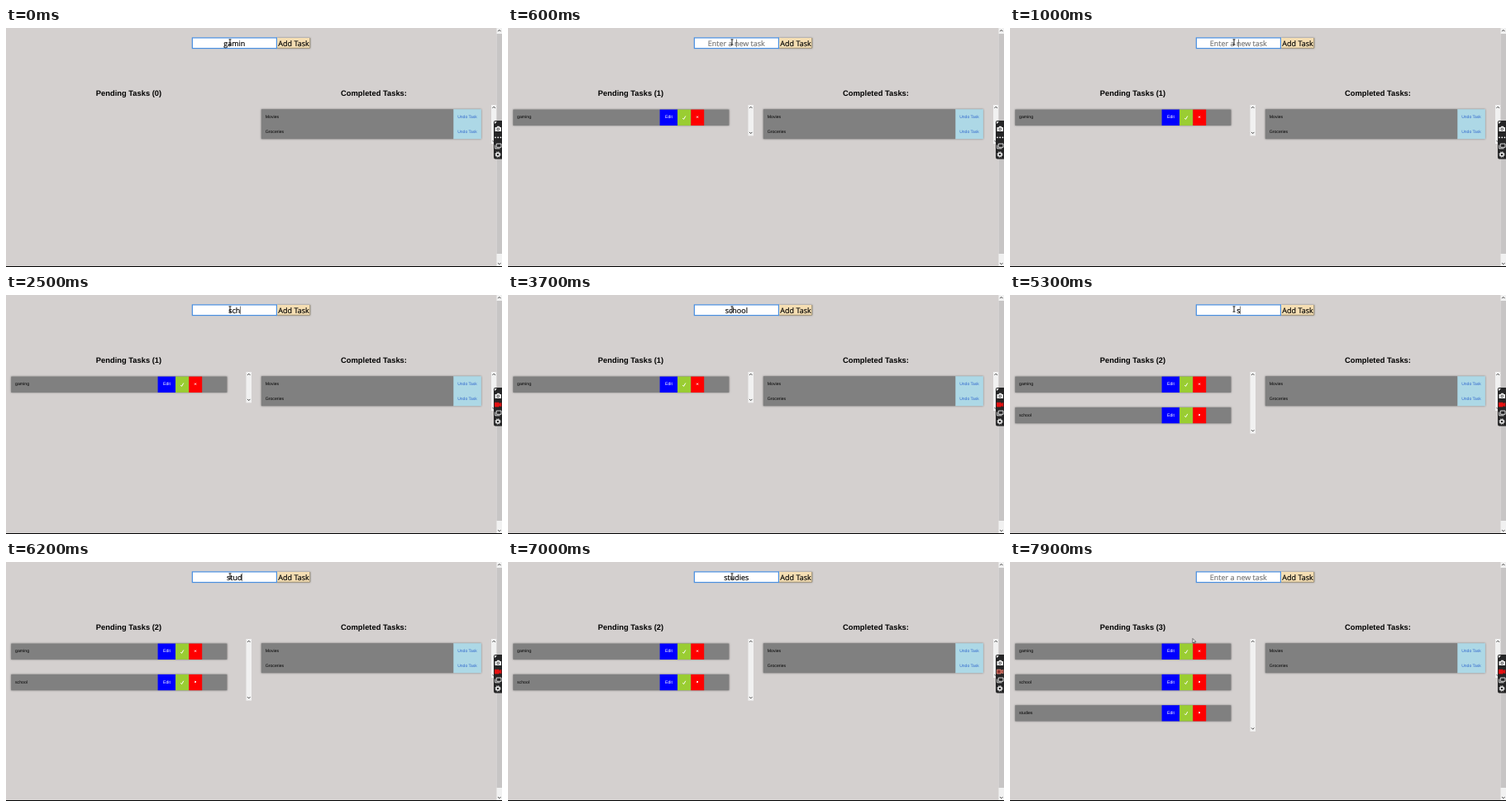
These frames come from a looping animation (600 px wide and 289 px high, 8000 ms). An HTML page:

```html
<!DOCTYPE html>
<html lang="en">
<head>
<meta charset="utf-8">
<title>Task list</title>
<style>
  html, body { margin: 0; width: 100%; height: 100%; overflow: hidden; background: #d4d0cf; }
  svg { display: block; width: 100%; height: 100%; }
  text { text-rendering: geometricPrecision; font: 5.2px "Liberation Sans", Arial, sans-serif; }
  .head { font-weight: bold; font-size: 9.35px; text-anchor: middle; }
  .form { font: 9px "Open Sans", "Noto Sans", sans-serif; text-anchor: middle; stroke: currentColor; stroke-width: .18px; }
  .undo { font-size: 5px; fill: #2f66cc; text-anchor: middle; }
  .card { filter: drop-shadow(0 .8px .9px #0006); }
  .line { fill: none; stroke-width: 1; }
</style>
</head>
<body>
<svg viewBox="0 0 600 289" preserveAspectRatio="none">
  <defs>
    <path id="up" class="line" stroke="#444" d="M-1.7 .9 0 -.8 1.7 .9"/>
    <path id="down" class="line" stroke="#444" d="M-1.7 -.9 0 .8 1.7 -.9"/>
    <g id="buttons">
      <rect x="183.6" y="98.6" width="21.5" height="19.3" fill="#00f"/>
      <rect x="205.1" y="98.6" width="16.2" height="19.3" fill="#9acd32"/>
      <rect x="221.3" y="98.6" width="15.9" height="19.3" fill="#f00"/>
      <text x="190" y="109.4" fill="#fff">Edit</text>
      <path class="line" stroke="#fff" d="M211.3 109 212.5 110.400 214.8 106.5"/>
      <path class="line" stroke="#fff" stroke-width=".8" d="M228.2 106.7 230 108.5M230 106.7 228.2 108.5"/>
    </g>
  </defs>

  <rect width="600" height="289" fill="#d4d0cf"/>

  <!-- new task form -->
  <rect x="328" y="12" width="40" height="12.5" fill="#f5deb3" class="card"/>
  <path class="line" stroke="#9b8f78" stroke-width=".7" d="M328 24.3H367.7V12"/>
  <rect x="225.4" y="11.9" width="102" height="12.7" fill="#fff" stroke="#4a90e2" stroke-width="1.2"/>
  <text class="form" x="348" y="21.5">Add Task</text>
  <text class="form" id="entry" x="276.3" y="21.5"></text>
  <rect id="caret" y="13.6" width=".7" height="9.6" fill="#444"/>

  <text class="head" id="pending" x="148.5" y="82.4"></text>
  <text class="head" x="445" y="82.4">Completed Tasks:</text>

  <!-- pending list -->
  <g id="rows"></g>
  <g id="bar">
    <rect id="track" x="290.5" y="93" width="6.5" fill="#f1f1f1"/>
    <use href="#up" x="293.7" y="96"/>
    <use href="#down" id="barEnd" x="293.7"/>
  </g>

  <!-- completed list -->
  <g class="card">
    <rect x="308.8" y="98.2" width="232.500" height="36" fill="#808080"/>
    <rect x="541.3" y="98.2" width="33.6" height="36" fill="#add8e6"/>
  </g>
  <text x="313.7" y="109.3">Movies</text>
  <text x="313.7" y="127.4">Groceries</text>
  <text class="undo" x="558" y="109.3">Undo Task</text>
  <text class="undo" x="558" y="127.4">Undo Task</text>
  <rect x="587" y="93" width="6.5" height="47" fill="#f1f1f1"/>
  <use href="#up" x="590.2" y="96"/>
  <use href="#down" x="590.2" y="137"/>

  <!-- page scrollbar -->
  <rect x="593.5" width="6.5" height="289" fill="#f1f1f1"/>
  <rect x="593.5" y="7" width="6.5" height="266" fill="#c7c5c5"/>
  <use href="#up" x="596.8" y="3.2"/>
  <use href="#down" x="596.8" y="285"/>
  <rect y="288" width="600" height="1"/>

  <!-- capture toolbar -->
  <path fill="#252526" d="M600 112H592Q590 112 590 114V156Q590 158.5 592 158.5H600Z"/>
  <path fill="#fff" d="M591 113.3H594L591 116Z"/>
  <g class="line" stroke="#eee">
    <path fill="#eee" stroke="none" d="M591.5 120H593.5L594.2 118.7H596.8L597.5 120H599V125H591.5Z"/>
    <circle cx="595.3" cy="122.3" r="1.3" stroke="#252526" stroke-width=".8"/>
    <path d="M593.3 140H599V144.3H593.3ZM591.7 141.5V145.8H597.5" stroke-width=".9"/>
    <circle cx="595" cy="153" r="2" stroke-width="1.5"/>
    <circle cx="595" cy="153" r="3.2" stroke-dasharray="1.25 1.263"/>
  </g>
  <g id="dots" fill="#fff">
    <circle cx="592" cy="132.3" r=".9"/><circle cx="595.2" cy="132.3" r=".9"/><circle cx="598.4" cy="132.3" r=".9"/>
  </g>
  <path id="camera" stroke-width=".8" d="M591.4 130.2H596.3V135H591.4ZM596.3 132 598.9 130.4V134.8L596.3 133.2"/>

  <!-- pointers -->
  <path id="beam" class="line" stroke="#222" stroke-width=".8" d="M269.5 13.9H272.5M271 13.9V20.2M269.5 20.2H272.5"/>
  <path id="arrow" fill="#fff" stroke="#222" stroke-width=".6" d="M0 0V5.4L1.3 4.3 2.2 6.3 3.1 5.9 2.2 3.9H3.9Z"/>
</svg>

<script>
const LOOP = 8000;
const typing = [
  [0, "gamin"], [100, "gaming"], [600, ""],
  [1900, "s"], [2100, "sc"], [2400, "sch"], [2700, "scho"], [2900, "schoo"], [3100, "school"], [4200, ""],
  [5200, "s"], [5600, "st"], [5900, "stu"], [6100, "stud"], [6300, "studi"], [6500, "studie"], [6800, "studies"], [7200, ""]
];
const tasks = [["gaming", 600], ["school", 4200], ["studies", 7200]];
const caretOn = [[100, 1100], [1600, 3700], [4700, 6950], [7400, 7700]];
const recordFlips = [1900, 2100, 2400, 2700, 3100, 3400, 3700, 4000, 4500, 4800, 5000, 5400,
                     5700, 5900, 6200, 6400, 6700, 7000, 7400, 7500, 7800];
const ROW_STEP = 37.3;

const el = id => document.getElementById(id);
const show = (node, on) => node.setAttribute("visibility", on ? "visible" : "hidden");

el("rows").innerHTML = tasks.map(([name], i) => `
  <g transform="translate(0 ${i * ROW_STEP})">
    <rect class="card" x="6.2" y="98.6" width="261.2" height="19.3" fill="#808080"/>
    <text x="11" y="109.4">${name}</text>
    <use href="#buttons"/>
  </g>`).join("");
const rows = [...el("rows").children];

function drawEntry(t) {
  const value = typing.filter(([at]) => at <= t).pop()[1];
  const entry = el("entry");
  const label = value || "Enter a new task";
  const color = value ? "#000" : "#757575";
  if (entry.textContent !== label) entry.textContent = label;
  entry.setAttribute("fill", color);
  entry.setAttribute("color", color);
  const half = value ? entry.getComputedTextLength() / 2 : 0;
  el("caret").setAttribute("x", 276 + half);
  show(el("caret"), caretOn.some(([from, to]) => t >= from && t < to));
}

function drawPending(t) {
  const count = tasks.filter(([, at]) => at <= t).length;
  const height = count * ROW_STEP;
  el("pending").textContent = `Pending Tasks (${count})`;
  rows.forEach((row, i) => show(row, i < count));
  show(el("bar"), count > 0);
  el("track").setAttribute("height", height);
  el("barEnd").setAttribute("y", 89.5 + height);
}

function drawRecorder(t) {
  const flips = recordFlips.filter(at => at <= t).length;
  const bright = flips % 2 === 1;
  show(el("dots"), flips === 0);
  show(el("camera"), flips > 0);
  el("camera").setAttribute("fill", bright ? "#e81212" : "#8c3430");
  el("camera").setAttribute("stroke", bright ? "#e81212" : "#ff9a88");
}

function drawPointer(t) {
  const p = Math.min(1, Math.max(0, (t - 7500) / 350));
  const ease = p * p * (3 - 2 * p);
  show(el("beam"), p === 0);
  show(el("arrow"), p > 0);
  el("arrow").setAttribute("transform", `translate(${271 - 50 * ease} ${17 + 75.5 * ease})`);
}

function frame() {
  const t = performance.now() % LOOP;
  drawEntry(t);
  drawPending(t);
  drawRecorder(t);
  drawPointer(t);
  requestAnimationFrame(frame);
}
frame();
</script>
</body>
</html>
```
